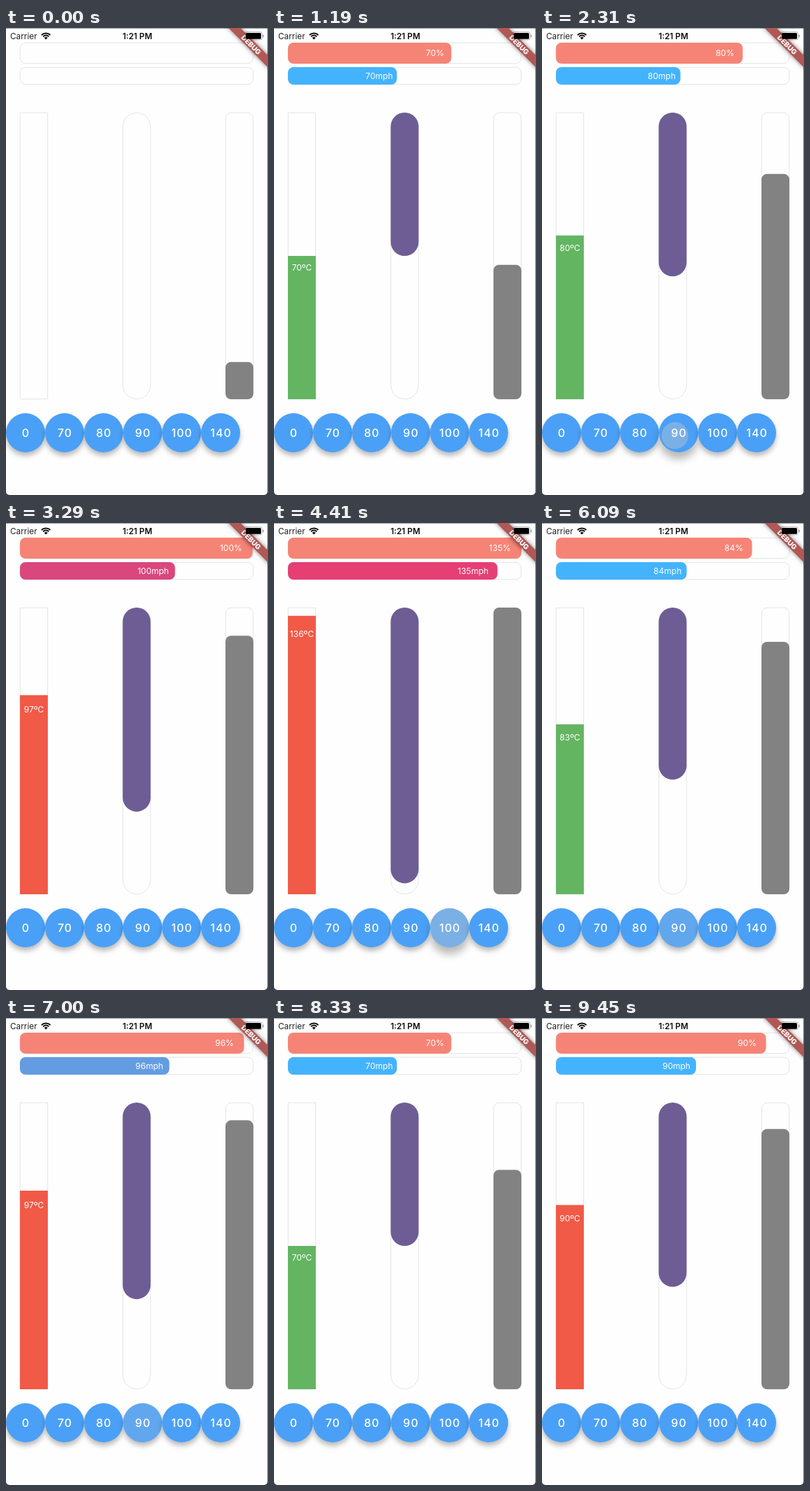
Write an HTML page with a canvas that moves like this. It is 376 px wide and 668 px high and loops after 9.52 s.

```html
<!DOCTYPE html>
<html lang="en">
<head>
<meta charset="utf-8">
<title>Animated progress bars</title>
<style>
  html, body { margin: 0; width: 100%; height: 100%; overflow: hidden; background: #fff; }
  canvas { display: block; width: 376px; height: 668px; }
</style>
</head>
<body>
<canvas id="stage" width="376" height="668"></canvas>
<script>
const ctx = document.getElementById('stage').getContext('2d');
const LOOP = 9520, STEP = 70, FONT = 'Inter, Roboto, sans-serif';
const BUTTONS = [0, 70, 80, 90, 100, 140];

// Each tap: release time, chosen value, how long the finger was down.
const TAPS = [
  [-755, 0], [520, 70], [1380, 80], [2380, 90], [3000, 100], [3650, 140],
  [4370, 100], [5350, 80], [5970, 90], [6380, 100], [6880, 90],
  [7350, 80], [7690, 70], [8400, 100, 60], [9050, 90]
].map(([at, value, hold = 150]) => ({ at, value, hold }));

const BARS = [
  { x: 20, y: 21, w: 335, h: 30, r: 8, max: 100, time: 300, color: [246, 132, 118], unit: '%', from: 'left' },
  { x: 20, y: 56, w: 335, h: 25, r: 8, max: 150, time: 300, color: [68, 179, 253],
    hot: [229, 63, 116], limit: 100, unit: 'mph', from: 'left' },
  { x: 20, y: 121, w: 40, h: 410, r: 0, max: 140, time: 400, color: [100, 181, 98],
    hot: [240, 90, 70], limit: 90, unit: 'ºC', from: 'bottom' },
  { x: 167.5, y: 121, w: 40, h: 410, r: 20, max: 140, time: 300, color: [110, 93, 149], from: 'top' },
  { x: 315, y: 121, w: 40, h: 410, r: 8, max: 100, time: 1000, color: [130, 130, 130], from: 'bottom' }
];

const clamp = (v, lo = 0, hi = 1) => Math.min(hi, Math.max(lo, v));
const mix = (a, b, k) => a + (b - a) * k;
const rgb = c => `rgb(${c.map(Math.round).join(',')})`;

// Linear tweens, each starting wherever the previous one was interrupted.
function valueAt(t, duration) {
  let value = 53;
  TAPS.forEach((tap, i) => {
    if (t < tap.at) return;
    const next = TAPS[i + 1];
    const until = next ? Math.min(t, next.at) : t;
    value = mix(value, tap.value, clamp((until - tap.at) / duration));
  });
  return value;
}

function roundRect(x, y, w, h, r) {
  ctx.beginPath();
  ctx.roundRect(x, y, w, h, Math.min(r, w / 2, h / 2));
}

function text(str, x, y, size, weight, color, align = 'center', spacing = 0) {
  ctx.font = `${weight} ${size}px ${FONT}`;
  ctx.letterSpacing = spacing + 'px';
  ctx.fillStyle = color;
  ctx.textAlign = align;
  ctx.textBaseline = 'alphabetic';
  ctx.fillText(str, x, y + size * 0.364);
  ctx.letterSpacing = '0px';
}

function drawBar(bar, t) {
  const value = valueAt(t, bar.time);
  const part = clamp(value / bar.max);
  let { x, y, w, h } = bar;

  roundRect(x + 0.25, y + 0.25, w - 0.5, h - 0.5, bar.r);
  ctx.strokeStyle = '#c4c8ca';
  ctx.lineWidth = 0.5;
  ctx.stroke();
  if (part <= 0) return;

  if (bar.from === 'left') w *= part;
  else h *= part;
  if (bar.from === 'bottom') y += bar.h - h;

  const heat = bar.hot ? clamp((value - bar.limit + 5) / 5) : 0;
  ctx.save();
  roundRect(x, y, w, h, bar.r);
  ctx.fillStyle = rgb(bar.color.map((c, i) => heat ? mix(c, bar.hot[i], heat) : c));
  ctx.fill();
  ctx.clip();
  if (bar.unit) {
    const label = Math.round(value) + bar.unit;
    ctx.font = `400 12px ${FONT}`;
    const width = ctx.measureText(label).width;
    if (bar.from === 'left') text(label, x + (w - width) * 0.95, y + h / 2, 12, 400, '#fff', 'left');
    else text(label, x + w / 2, y + (h - 14) * 0.05 + 7, 12, 400, '#fff');
  }
  ctx.restore();
}

function drawButton(value, i, t) {
  const x = 28 + 56 * i, y = 579, r = 28;
  const tap = TAPS.find(p => p.value === value && t >= p.at - p.hold && t < p.at + 200);
  const age = tap ? t - tap.at + tap.hold : 0;
  const lift = tap ? clamp(age / 80) * clamp((tap.at + 100 - t) / 60) : 0;

  ctx.save();
  ctx.shadowColor = 'rgba(0,0,0,.27)';
  ctx.shadowBlur = 7 + 5 * lift;
  ctx.shadowOffsetY = 5 + 5 * lift;
  ctx.beginPath();
  ctx.arc(x, y, r, 0, 7);
  ctx.fillStyle = '#4aa0f6';
  ctx.fill();
  ctx.restore();

  if (tap) {
    const off = clamp(1 - age / 190);
    ctx.save();
    ctx.clip();
    ctx.beginPath();
    ctx.arc(x - 9 * off, y + 7 * off, 8 + 0.14 * age, 0, 7);
    ctx.fillStyle = `rgba(200,200,200,${0.39 * clamp((tap.at + 190 - t) / 150)})`;
    ctx.fill();
    ctx.restore();
  }
  text(String(value), x + 0.5, y, 16, 500, '#fff', 'center', 1);
}

function drawStatus() {
  text('Carrier', 6, 11.5, 11.8, 400, '#222', 'left');
  text('1:21 PM', 188.5, 11.5, 11.8, 600, '#111');

  ctx.strokeStyle = ctx.fillStyle = '#111';
  ctx.lineWidth = 2;
  const start = -Math.PI * 0.75, end = -Math.PI * 0.25;
  for (const r of [9, 5.8]) {
    ctx.beginPath();
    ctx.arc(57.3, 16.4, r, start, end);
    ctx.stroke();
  }
  ctx.beginPath();
  ctx.moveTo(57.3, 16.4);
  ctx.arc(57.3, 16.4, 3.5, start, end);
  ctx.fill();
}

function drawBattery() {
  roundRect(342.5, 5.5, 25, 11.5, 3);
  ctx.strokeStyle = 'rgba(0,0,0,.35)';
  ctx.lineWidth = 0.8;
  ctx.stroke();
  ctx.fillStyle = '#000';
  roundRect(344, 7, 22, 8.7, 1.5);
  ctx.fill();
  ctx.fillStyle = 'rgba(0,0,0,.4)';
  roundRect(368.5, 9.5, 1.4, 4, 0.7);
  ctx.fill();
}

function drawBanner() {
  ctx.save();
  ctx.translate(376, 0);
  ctx.rotate(Math.PI / 4);
  ctx.save();
  ctx.shadowColor = 'rgba(0,0,0,.5)';
  ctx.shadowBlur = 6;
  ctx.fillStyle = '#b15855';
  ctx.fillRect(-42, 28, 84, 12);
  ctx.restore();
  text('DEBUG', 0, 34, 10, 800, '#fff');
  ctx.restore();
}

function drawScreen() {
  ctx.fillStyle = '#2b434c';
  ctx.fillRect(0, 0, 376, 668);
  ctx.fillStyle = '#fefefe';
  ctx.beginPath();
  ctx.roundRect(0, 0.5, 375.3, 667.5, [0, 0, 5, 5]);
  ctx.fill();
}

function frame(now) {
  const t = Math.floor((now % LOOP) / STEP) * STEP;
  drawScreen();
  drawStatus();
  BARS.forEach(bar => drawBar(bar, t));
  BUTTONS.forEach((value, i) => drawButton(value, i, t));
  drawBanner();
  drawBattery();
}

const began = performance.now();
function tick() {
  frame(performance.now() - began);
  requestAnimationFrame(tick);
}
tick();
</script>
</body>
</html>
```
